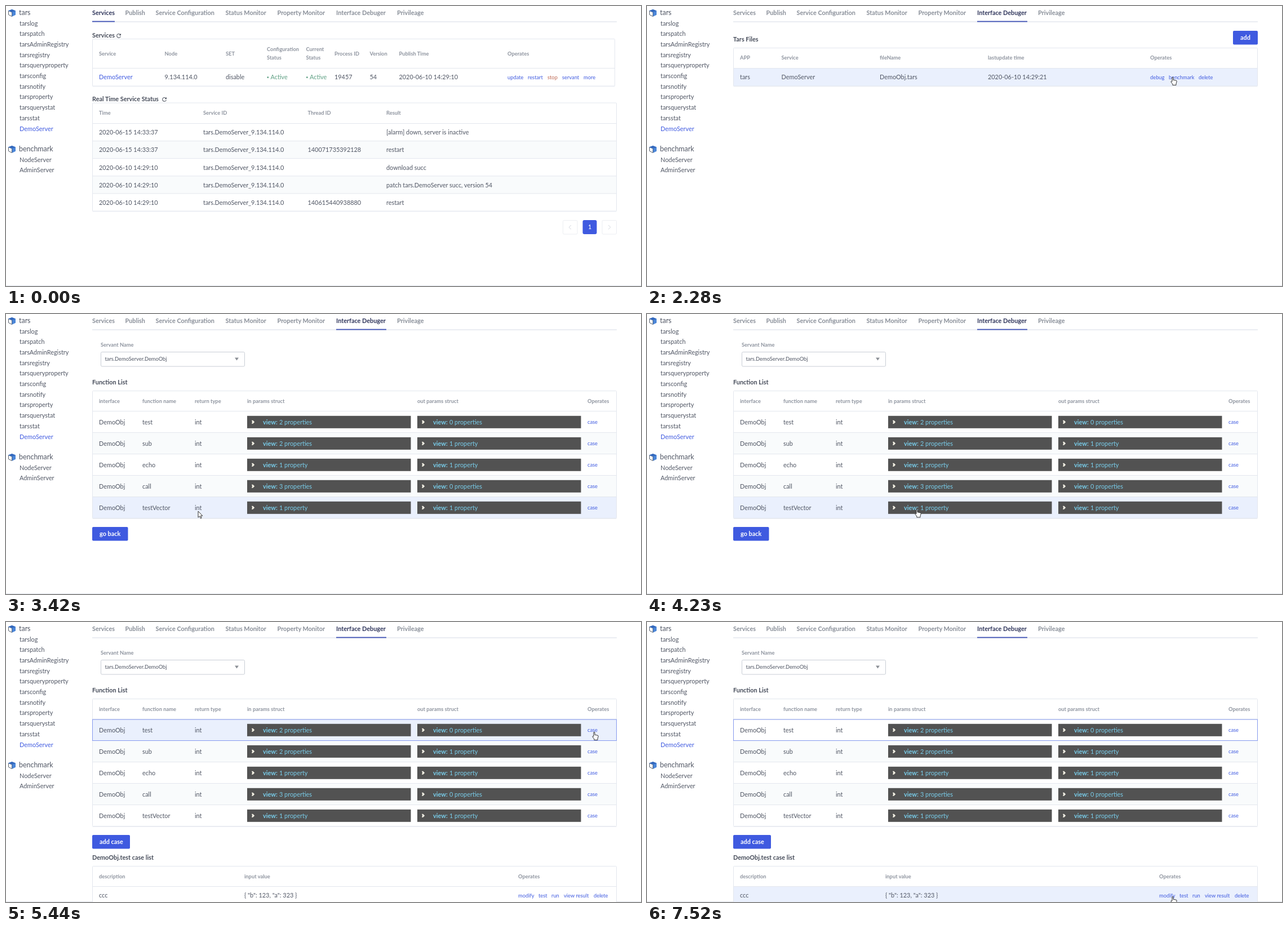
An HTML page for the animation above (8000 ms loop, 1127 by 497 pixels).

```html
<!DOCTYPE html>
<html lang="en">
<head>
<meta charset="utf-8">
<title>Service console</title>
<style>
  html, body { margin: 0; width: 100%; height: 100%; overflow: hidden; background: #fff; }
  svg { display: block; font: 10.88px Lato, sans-serif; fill: #505664; }
  text { white-space: pre; }
  .small { font-size: 9.32px; }
  .app { font-size: 12.43px; }
  .bold { font-weight: 700; }
  .head { font-size: 9.32px; font-weight: 700; fill: #8e949f; }
  .title { font-weight: 700; fill: #454b59; }
  .tab { font-weight: 700; fill: #888e98; }
  .tab.active { fill: #30365c; }
  .link { fill: #3f5ae0; }
  .stop { fill: #bd6650; }
  .ok { fill: #5fa084; }
  .view { fill: #79cdea; }
  .white { fill: #fff; }
  .line { stroke: #e3e7ee; fill: none; }
  .back { fill: #fff; }
  .stripe .back { fill: #f9fbfc; }
  .hover .back { fill: #eaf0fd; }
  #cursor { pointer-events: none; }
</style>
</head>
<body>
<svg id="stage" width="1127" height="497" viewBox="0 0 1127 497"></svg>
<script>
const LEFT = 153.5, RIGHT = 1083.5, LOOP = 8000;
const stage = document.getElementById('stage');

// All text is placed by its left edge and vertical centre.
const text = (x, y, str, cls = '') => {
  const size = /small|head/.test(cls) ? 9.32 : /app/.test(cls) ? 12.43 : 10.88;
  return `<text class="${cls}" x="${x}" y="${(y + size * .35).toFixed(2)}">${str}</text>`;
};
const rect = (x, y, w, h, attrs) => `<rect x="${x}" y="${y}" width="${w}" height="${h}" ${attrs}/>`;
const path = (d, attrs) => `<path d="${d}" ${attrs}/>`;
const link = (x, y, str, cls = 'small link') => text(x, y, str, cls + ' hand');
const cells = (xs, y, values, cls) => values.map((v, i) => text(xs[i], y, v, cls)).join('');
const button = (x, y, w, label, pad) =>
  `<g class="hand">${rect(x, y, w, 24.5, 'rx="2" fill="#3f5ae0"')}${text(x + pad, y + 12, label, 'bold white')}</g>`;
const refresh = (x, y) =>
  path(`M${x + 3} ${y - 2}A3.4 3.4 0 1 0 ${x + 3.4} ${y + .8}M${x + 3.5} ${y - 3.8}v2.4h-2.4`,
       'fill="none" stroke="#555b66" stroke-width="1.1"');
const row = (y, h, content, cls = '', right = RIGHT) =>
  `<g class="row ${cls}">${rect(LEFT, y, right - LEFT, h, 'class="back"')}${content}` +
  path(`M${LEFT} ${y}H${right}`, 'class="line"') + '</g>';
const frame = (top, bottom, right = RIGHT) =>
  rect(LEFT, top, right - LEFT, bottom - top, 'class="line" rx="1"') +
  path(`M${LEFT} ${bottom + .8}H${right}`, 'class="line" opacity=".7"');

function cube(y) {
  return path(`M4.5 ${y - 4}L10.5 ${y - 1.5}V${y + 6}L4.5 ${y + 3}Z`, 'fill="#fff" stroke="#59606c"') +
    path(`M4 ${y - 4}L10.5 ${y - 6.5}L17 ${y - 4}V${y + 3.2}L10.8 ${y + 6.3}V${y - 1.5}Z`, 'fill="#4b86d8"') +
    path(`M4 ${y - 4}L10.5 ${y - 6.5}L17 ${y - 4}L10.8 ${y - 1.5}Z`, 'fill="#3569bd"');
}

function sidebar() {
  const group = (y, name, items) => cube(y + .5) + text(23, y, name, 'app') +
    items.map((item, i) => text(24, y + 18.7 * (i + 1), item, item === 'DemoServer' ? 'link' : '')).join('');
  return group(12, 'tars', ['tarslog', 'tarspatch', 'tarsAdminRegistry', 'tarsregistry', 'tarsqueryproperty',
      'tarsconfig', 'tarsnotify', 'tarsproperty', 'tarsquerystat', 'tarsstat', 'DemoServer']) +
    group(254, 'benchmark', ['NodeServer', 'AdminServer']);
}

function tabs(active) {
  const xs = [153, 211.5, 265.5, 389.5, 481.5, 586, 694];
  const names = ['Services', 'Publish', 'Service Configuration', 'Status Monitor', 'Property Monitor',
    'Interface Debuger', 'Privileage'];
  const [x, w] = active ? [586, 89] : [153, 40];
  return names.map((n, i) => text(xs[i], 12, n, 'hand tab' + (i === active ? ' active' : ''))).join('') +
    path('M153 28H1084', 'class="line" stroke-width="1.4"') + rect(x, 26.6, w, 1.8, 'fill="#3f51b5"');
}

function servicesPage() {
  const cols = [165, 281.5, 390, 463, 532.5, 583, 645.5, 697.5, 890];
  const active = x => rect(x + .5, 125.3, 2.6, 2.6, 'rx="1" class="ok"') + text(x + 6.5, 126.5, 'Active', 'ok');
  const heads = cells(cols, 84.5, ['Service', 'Node', 'SET', '', '', 'Process ID', 'Version', 'Publish Time', 'Operates'], 'head') +
    cells([463, 532.5], 77, ['Configuration', 'Current'], 'head') + cells([463, 532.5], 92, ['Status', 'Status'], 'head');
  const service = link(165, 126.5, 'DemoServer', 'link') +
    cells(cols, 126.5, ['', '9.134.114.0', 'disable', '', '', '19457', '54', '2020-06-10 14:29:10']) +
    active(463) + active(532.5) +
    link(890, 126.5, 'update') + link(926, 126.5, 'restart') + link(961, 126.5, 'stop', 'small stop') +
    link(987, 126.5, 'servant') + link(1025, 126.5, 'more');

  const logCols = [165, 350, 535.5, 675];
  const log = [
    ['15 14:33:37', '', '[alarm] down, server is inactive'],
    ['15 14:33:37', '140071735392128', 'restart'],
    ['10 14:29:10', '', 'download succ'],
    ['10 14:29:10', '', 'patch tars.DemoServer succ, version 54'],
    ['10 14:29:10', '140615440938880', 'restart'],
  ].map(([time, thread, result], i) => {
    const y = 208.5 + 31.1 * i;
    return row(y, 31.1, cells(logCols, y + 16, ['2020-06-' + time, 'tars.DemoServer_9.134.114.0', thread, result]),
      i % 2 ? 'stripe' : '');
  }).join('');

  const pager = [988.5, 1058].map((x, i) => rect(x, 380.5, 25.5, 24.5, 'rx="2" fill="#fff" stroke="#eceef2"') +
      path(i ? `M${x + 11} 389l4 3.7-4 3.7` : `M${x + 14.5} 389l-4 3.7 4 3.7`, 'fill="none" stroke="#d4d8df"')).join('') +
    rect(1023.5, 380, 25, 25, 'rx="3" fill="#3f5ae0"') + text(1033, 392.5, '1', 'white');

  return tabs(0) + text(153, 52, 'Services', 'title') + refresh(200, 53) + heads +
    row(110.5, 31.5, service, '', 1080.5) + frame(58.5, 142, 1080.5) +
    text(153, 165, 'Real Time Service Status', 'title') + refresh(281, 166) +
    cells(logCols, 190, ['Time', 'Service ID', 'Thread ID', 'Result'], 'head') + log + frame(172, 364) + pager;
}

function filesPage() {
  const cols = [165, 238.5, 413, 605, 893];
  return tabs(5) + text(153, 59.5, 'Tars Files', 'title') + button(1040, 44, 44, 'add', 13) +
    cells(cols, 92, ['APP', 'Service', 'fileName', 'lastupdate time', 'Operates'], 'head') +
    row(110.5, 31.5, cells(cols, 126.5, ['tars', 'DemoServer', 'DemoObj.tars', '2020-06-10 14:29:21']) +
      link(893, 126.5, 'debug') + link(926, 126.5, 'benchmark') + link(979, 126.5, 'delete')) +
    frame(74.5, 142);
}

function functionsPage(withCases) {
  const cols = [165, 242, 335, 428, 730, 1032];
  const bar = (x, y, count) => `<g class="hand">${rect(x, y - 11, 290.5, 22, 'fill="#525252"')}` +
    path(`M${x + 8} ${y - 3}h2.2l3 3-3 3h-2.2l1-3z`, 'fill="#f4f1e4"') + text(x + 28, y, 'view:', 'bold view') +
    text(x + 57, y, `${count} propert${count === 1 ? 'y' : 'ies'}`, 'view') + '</g>';
  const rows = [['test', 2, 0], ['sub', 2, 1], ['echo', 1, 1], ['call', 3, 0], ['testVector', 1, 1]]
    .map(([name, ins, outs], i) => {
      const y = 172.5 + 38 * i, mid = y + 19.3;
      return row(y, 38, cells(cols, mid, ['DemoObj', name, 'int']) + bar(428, mid, ins) + bar(730, mid, outs) +
        link(1032, mid, 'case'), i % 2 ? 'stripe' : '');
    }).join('');
  const page = tabs(5) + text(168, 55, 'Servant Name', 'head') +
    rect(168.5, 67.5, 255, 25.5, 'rx="2" fill="#fff" stroke="#c9ced6"') +
    text(175.5, 79.5, 'tars.DemoServer.DemoObj', 'small') + path('M406 77.5h7l-3.5 5z', 'fill="#8b8f96"') +
    text(153, 121, 'Function List', 'title') +
    cells(cols, 154.5, ['interface', 'function name', 'return type', 'in params struct', 'out params struct', 'Operates'], 'head') +
    rows + frame(136.5, 362.5);
  if (!withCases) return page + button(153, 378, 63.5, 'go back', 13);

  return page + rect(LEFT, 173, RIGHT - LEFT, 37.5, 'fill="none" stroke="#8599ee"') +
    button(153, 378, 67, 'add case', 13) + text(153, 418.5, 'DemoObj.test case list', 'title') +
    rect(LEFT, 433.5, RIGHT - LEFT, 70, 'class="back"') +
    cells([165, 423, 909], 451.5, ['description', 'input value', 'Operates'], 'head') +
    row(469.5, 31, cells([165, 423], 485.5, ['ccc', '{ "b": 123, "a": 323 }']) +
      link(909, 485.5, 'modify') + link(945, 485.5, 'test') + link(968, 485.5, 'run') +
      link(990, 485.5, 'view result') + link(1043, 485.5, 'delete')) +
    frame(433.5, 503);
}

// Page and the moment it opens.
const pages = [[0, servicesPage()], [1460, filesPage()], [2655, functionsPage(false)], [5090, functionsPage(true)]];

// Pointer moves: start, end, number of steps, way points.
const moves = [
  [260, 920, 8, [[866, 370], [890, 152], [905, -20]]],
  [1090, 1830, 9, [[650, 2], [632, 12], [632, 13], [720, 27]]],
  [1940, 2110, 3, [[790, 80], [900, 120], [930, 160]]],
  [2280, 3030, 9, [[933, 126], [908, 126], [906, 126], [912, 184], [700, 262]]],
  [3150, 3950, 10, [[600, 290], [341, 350], [300, 402], [430, 364]]],
  [4060, 4230, 3, [[452, 358], [479, 346.5]]],
  [4350, 4730, 5, [[620, 320], [1010, 167], [1020, 185]]],
  [4910, 5440, 7, [[1034, 191], [1044, 195]]],
  [5620, 6120, 6, [[1040, 215], [1010, 330], [945, 438]]],
  [6580, 6870, 4, [[942, 455], [931, 492]]],
  [7520, 7520, 1, [[933, 487]]],
];

const ARROW = 'M0 0V11.2L2.6 8.8L4.4 12.8L6.2 12L4.4 8.2H7.8Z';
const HAND = 'M-1 1Q0-.6 1 1V5.2L6 6.2Q7.4 6.6 7.2 8.2L6 12V14.4H-.2V12.4L-3.2 8.6Q-3.2 7-1 8Z';

stage.innerHTML = sidebar() + path('M0 496.3H1127', 'class="line"') +
  '<g id="page"></g><path id="cursor" fill="#fff" stroke="#333" stroke-linejoin="round"/>';
const pageNode = document.getElementById('page'), cursor = document.getElementById('cursor');
let shown;

function pointerAt(t) {
  const move = moves.filter(m => m[0] <= t).pop();
  if (!move) return [0, -50];
  const [start, end, steps, points] = move;
  if (steps === 1 || t >= end) return points[points.length - 1];
  const step = Math.floor((t - start) / (end - start) * (steps - 1) + 1e-6);
  const along = step / (steps - 1) * (points.length - 1), i = Math.floor(along);
  return points[i].map((v, axis) => v + (points[i + 1][axis] - v) * (along - i));
}

function draw(t) {
  const page = pages.filter(p => p[0] <= t).pop();
  if (page !== shown) pageNode.innerHTML = (shown = page)[1];
  const [x, y] = pointerAt(t);
  const under = document.elementFromPoint(x, y);
  const hovered = under && under.closest('.row');
  pageNode.querySelectorAll('.row').forEach(r => r.classList.toggle('hover', r === hovered));
  cursor.setAttribute('d', under && under.closest('.hand') ? HAND : ARROW);
  cursor.setAttribute('transform', `translate(${x} ${y})`);
}

function tick() {
  draw(performance.now() % LOOP);
  requestAnimationFrame(tick);
}
tick();
</script>
</body>
</html>
```
